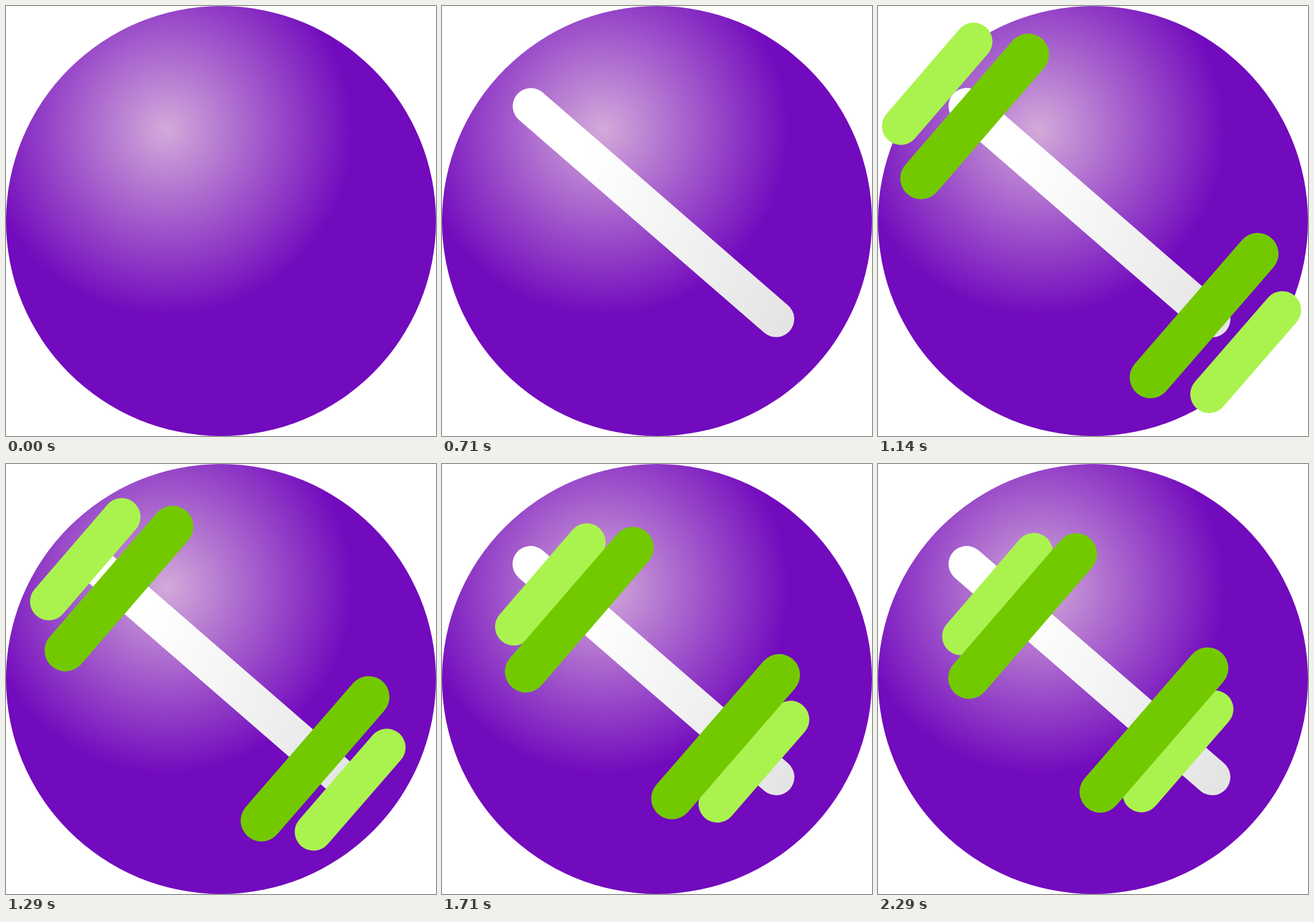
Animation of 640 by 640 pixels, one loop 2.78 s. Source, as an HTML page:

```html
<!DOCTYPE html>
<html lang="en">
<head>
<meta charset="utf-8">
<title>Dumbbell</title>
<style>
html, body { margin: 0; width: 100%; height: 100%; overflow: hidden; background: #fff; }
svg { display: block; width: 100%; height: 100%; }
line { stroke-linecap: round; }
.dark { stroke: #73c900; stroke-width: 62; }
.light { stroke: #aaf34e; stroke-width: 56; }
</style>
</head>
<body>
<svg viewBox="0 0 640 640">
  <defs>
    <radialGradient id="ball" gradientUnits="userSpaceOnUse" cx="239" cy="184" r="278">
      <stop offset="0" stop-color="#d3aada"/>
      <stop offset="1" stop-color="#720abd"/>
    </radialGradient>
    <linearGradient id="steel" gradientUnits="userSpaceOnUse" x1="215" y1="225" x2="558" y2="378">
      <stop offset="0" stop-color="#fff"/>
      <stop offset="1" stop-color="#e4e4e4"/>
    </linearGradient>
  </defs>
  <circle cx="320" cy="320" r="320" fill="url(#ball)"/>
  <line id="bar" x1="132" y1="149" x2="497.5" y2="466" stroke="url(#steel)" stroke-width="54"/>
  <line id="lightA" class="light" x1="232.5" y1="131" x2="124" y2="257"/>
  <line id="lightB" class="light" x1="500.5" y1="364.5" x2="391.5" y2="490"/>
  <line id="darkA" class="dark" x1="295" y1="134" x2="135.5" y2="318.5"/>
  <line id="darkB" class="dark" x1="490.5" y1="304" x2="331" y2="488"/>
</svg>
<script>
const LOOP = 2780, STEP = 500 / 7, LAST = 32, SLOPE = 0.868;
const $ = id => document.getElementById(id);

// id, first step, last step, horizontal distance to travel
const plates = [
  ["lightA", 4, 34, -332],
  ["lightB", 5, 34, 327],
  ["darkA", 3, 31.5, -369],
  ["darkB", 3, 31.5, 386]
];

// Part of the way still to go, along cubic-bezier(.5, 0, 0, 1)
function remaining(step, start, end) {
  const rest = Math.min(1, Math.max(0, (end - step) / (end - start)));
  let lo = 0, hi = 1;
  for (let i = 0; i < 30; i++) {
    const s = (lo + hi) / 2, u = 1 - s;
    if (s * s * s + 1.5 * s * s * u + 3 * s * u * u < rest) lo = s;
    else hi = s;
  }
  return lo * lo * (3 - 2 * lo);
}

function draw(now) {
  const step = Math.min(LAST, Math.floor((now % LOOP + 5) / STEP));
  const size = 1 - remaining(step, 0, 10.6);
  $("bar").setAttribute("transform",
    `translate(315 307.5) scale(${size}) translate(-315 -307.5)`);
  $("bar").style.display = step ? "" : "none";
  for (const [id, start, end, distance] of plates) {
    const x = distance * remaining(step, start, end);
    $(id).setAttribute("transform", `translate(${x} ${x * SLOPE})`);
  }
}

const begin = performance.now();
function tick() {
  draw(performance.now() - begin);
  requestAnimationFrame(tick);
}
tick();
</script>
</body>
</html>
```
